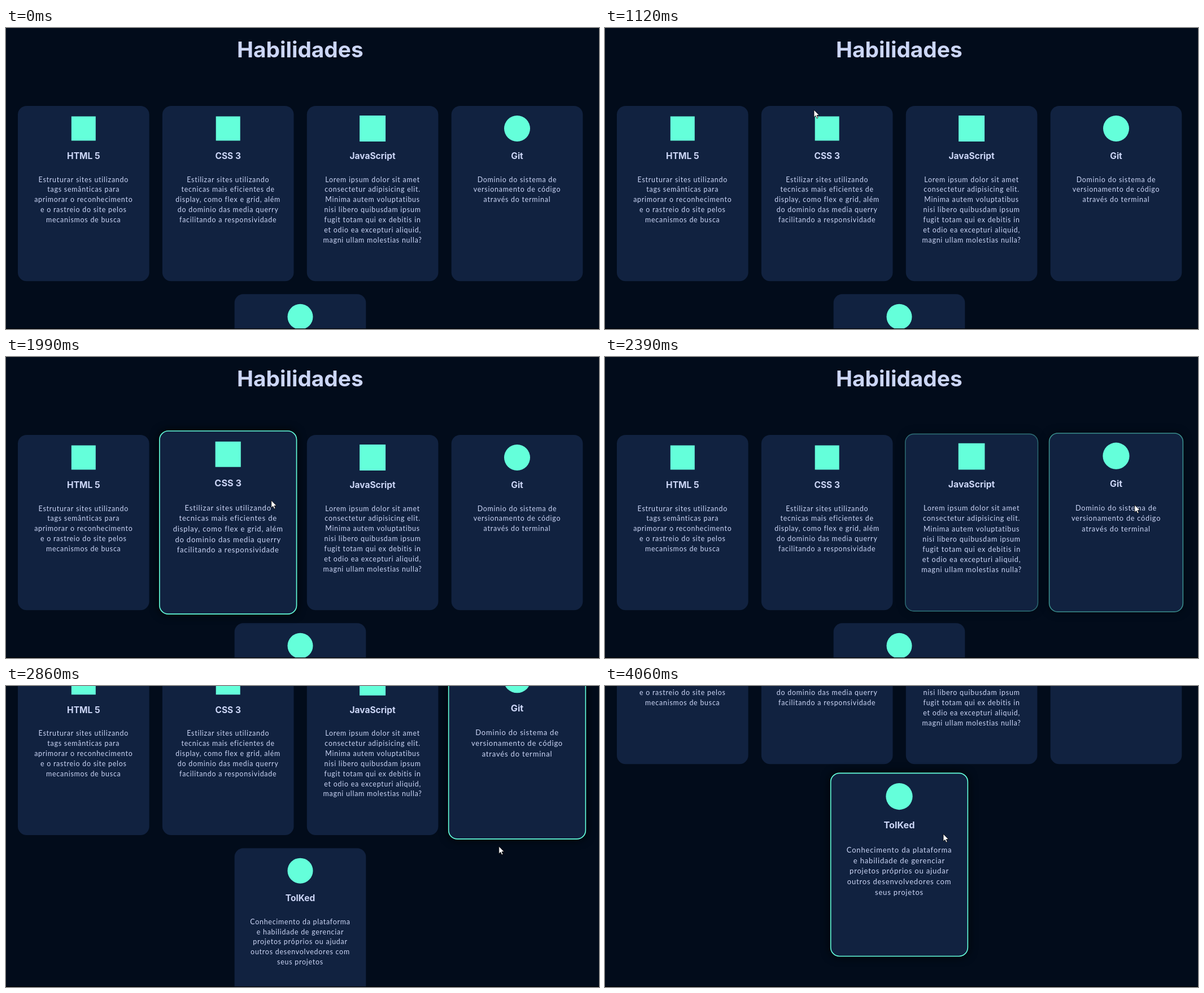
These frames come from a looping animation (1050 px wide and 533 px high, 4.13 s). An HTML page with a canvas:

```html
<!DOCTYPE html>
<html lang="pt">
<head>
<meta charset="utf-8">
<title>Habilidades</title>
<style>
  html, body { margin: 0; width: 100%; height: 100%; overflow: hidden; background: #020c1b; }
  canvas { display: block; }
</style>
</head>
<body>
<canvas id="stage" width="1050" height="533"></canvas>
<script>
const ctx = document.getElementById('stage').getContext('2d');
const LOOP = 4130, START = 120, TICK = 200 / 3, FADE = 300;
const ZOOM = 0.7755; // page zoom: cards are 300 x 400 page pixels
const W = 300 * ZOOM, H = 400 * ZOOM;
const BG = '#020c1b', CARD = '#112240', INK = '#ccd6f6', TEAL = '#64ffda';

// hover: [enter, leave] times in ms
const cards = [
  { x: 137.3, y: 138, icon: 'square', size: 43, title: 'HTML 5', hover: [[1180, 1540]],
    lines: ['Estruturar sites utilizando', 'tags semânticas para', 'aprimorar o reconhecimento',
      'e o rastreio do site pelos', 'mecanismos de busca'] },
  { x: 393.2, y: 138, icon: 'square', size: 43, title: 'CSS 3', hover: [[1125, 1180], [1590, 2050]],
    lines: ['Estilizar sites utilizando', 'tecnicas mais eficientes de', 'display, como flex e grid, além',
      'do dominio das media querry', 'facilitando a responsividade'] },
  { x: 649.1, y: 138, icon: 'square', size: 46, title: 'JavaScript', hover: [[170, 420], [2060, 2270]],
    lines: ['Lorem ipsum dolor sit amet', 'consectetur adipisicing elit.', 'Minima autem voluptatibus',
      'nisi libero quibusdam ipsum', 'fugit totam qui ex debitis in', 'et odio ea excepturi aliquid,',
      'magni ullam molestias nulla?'] },
  { x: 905, y: 138, icon: 'circle', size: 46, title: 'Git', hover: [[2300, 2850]],
    lines: ['Dominio do sistema de', 'versionamento de código', 'através do terminal'] },
  { x: 521, y: 471.3, icon: 'circle', size: 45, title: 'TolKed', hover: [[3100, 9999]],
    lines: ['Conhecimento da plataforma', 'e habilidade de gerenciar', 'projetos próprios ou ajudar',
      'outros desenvolvedores com', 'seus projetos'] }
];

// [time, x, y]
const pointer = [
  [120, 1010, 495], [187, 720, 415], [320, 620, 250], [420, 565, 135], [520, 541, 90],
  [587, 546, 80], [720, 600, 65], [920, 600, 65], [1120, 370, 145], [1187, 250, 190],
  [1320, 135, 255], [1453, 180, 275], [1600, 290, 270], [1987, 470, 254], [2053, 536, 257],
  [2387, 938, 262], [2520, 965, 262], [2640, 965, 262], [2853, 873, 284], [3100, 636, 274],
  [3387, 523, 262], [3660, 497, 205], [3790, 482, 168], [3920, 540, 212], [4053, 599, 262]
];
// [time, offset]
const scroll = [[2600, 0], [2660, 26], [2853, 184], [3100, 271], [3387, 302], [3640, 310]];

// Smooth curve through the points that never overshoots them.
function follow(points, axis, t) {
  const last = points.length - 1;
  if (t <= points[0][0]) return points[0][axis];
  if (t >= points[last][0]) return points[last][axis];
  const slope = i => (points[i + 1][axis] - points[i][axis]) / (points[i + 1][0] - points[i][0]);
  const tangent = i => {
    if (i === 0 || i === last) return 0;
    const a = slope(i - 1), b = slope(i);
    return a * b <= 0 ? 0 : 2 * a * b / (a + b);
  };
  let i = 0;
  while (t >= points[i + 1][0]) i++;
  const span = points[i + 1][0] - points[i][0], u = (t - points[i][0]) / span, v = 1 - u;
  return v * v * (1 + 2 * u) * points[i][axis] + u * v * v * span * tangent(i)
    + u * u * (3 - 2 * u) * points[i + 1][axis] - u * u * v * span * tangent(i + 1);
}

// The CSS "ease" curve.
function ease(x) {
  if (x <= 0) return 0;
  if (x >= 1) return 1;
  const bez = (a, b, s) => 3 * a * s * (1 - s) ** 2 + 3 * b * s * s * (1 - s) + s ** 3;
  let lo = 0, hi = 1;
  for (let i = 0; i < 20; i++) {
    const mid = (lo + hi) / 2;
    if (bez(0.25, 0.25, mid) < x) lo = mid; else hi = mid;
  }
  return bez(0.1, 1, lo);
}

function lift(card, t) {
  return Math.max(...card.hover.map(([enter, leave]) =>
    ease((Math.min(t, leave) - enter) / FADE) * (1 - ease((t - leave) / FADE))));
}

function text(str, x, y, font, spacing = 0) {
  ctx.font = font;
  ctx.letterSpacing = spacing + 'px';
  ctx.fillStyle = INK;
  ctx.fillText(str, x, y);
}

function box(x, y, w, h, r) {
  ctx.beginPath();
  ctx.roundRect(x, y, w, h, r);
}

function drawCard(card, p, offset) {
  ctx.save();
  ctx.translate(card.x, card.y + H / 2 - offset);
  ctx.scale(1 + 0.05 * p, 1 + 0.05 * p);
  ctx.translate(0, -H / 2);

  ctx.save();
  if (p > 0) {
    ctx.shadowColor = `rgba(0, 0, 0, ${0.85 * p})`;
    ctx.shadowBlur = 16;
  }
  ctx.fillStyle = CARD;
  box(-W / 2, 0, W, H, 20 * ZOOM);
  ctx.fill();
  ctx.restore();

  if (p > 0) {
    const line = 2 * ZOOM;
    ctx.globalAlpha = p;
    ctx.strokeStyle = TEAL;
    ctx.lineWidth = line;
    box(-W / 2 + line / 2, line / 2, W - line, H - line, 20 * ZOOM - line / 2);
    ctx.stroke();
    ctx.globalAlpha = 1;
  }

  const s = card.size;
  ctx.fillStyle = TEAL;
  box(-s / 2, 40 - s / 2, s, s, card.icon === 'circle' ? s / 2 : 0);
  ctx.fill();

  text(card.title, 0, 93.8, `bold ${20 * ZOOM}px Inter, sans-serif`);
  card.lines.forEach((str, i) =>
    text(str, 0, 134.6 + i * 23 * ZOOM, `${16 * ZOOM}px Lato, sans-serif`, ZOOM));
  ctx.restore();
}

function drawPointer(x, y) {
  ctx.save();
  ctx.translate(x, y);
  ctx.beginPath();
  [[0, 0], [0, 13], [3, 10.3], [5, 15], [7.2, 14], [5.2, 9.6], [9.2, 9.4]]
    .forEach(([px, py]) => ctx.lineTo(px, py));
  ctx.closePath();
  ctx.fillStyle = '#fff';
  ctx.fill();
  ctx.strokeStyle = '#000';
  ctx.lineWidth = 0.8;
  ctx.stroke();
  ctx.restore();
}

function draw(t) {
  const offset = follow(scroll, 1, t);
  ctx.fillStyle = BG;
  ctx.fillRect(0, 0, 1050, 533);
  ctx.textAlign = 'center';
  text('Habilidades', 520.8, 51.5 - offset, `bold ${50 * ZOOM}px Inter, sans-serif`);

  cards.map(card => [card, lift(card, t)])
    .sort((a, b) => a[1] - b[1])
    .forEach(([card, p]) => drawCard(card, p, offset));

  ctx.fillStyle = '#000';
  ctx.fillRect(0, 532, 1050, 1);
  if (t >= START) drawPointer(follow(pointer, 1, t), follow(pointer, 2, t));
}

function frame(now) {
  const t = Math.floor((now % LOOP) / 10) * 10;
  draw(t < START ? 0 : START + Math.floor((t - START) / TICK + 1e-6) * TICK);
  requestAnimationFrame(frame);
}
requestAnimationFrame(frame);
</script>
</body>
</html>
```
